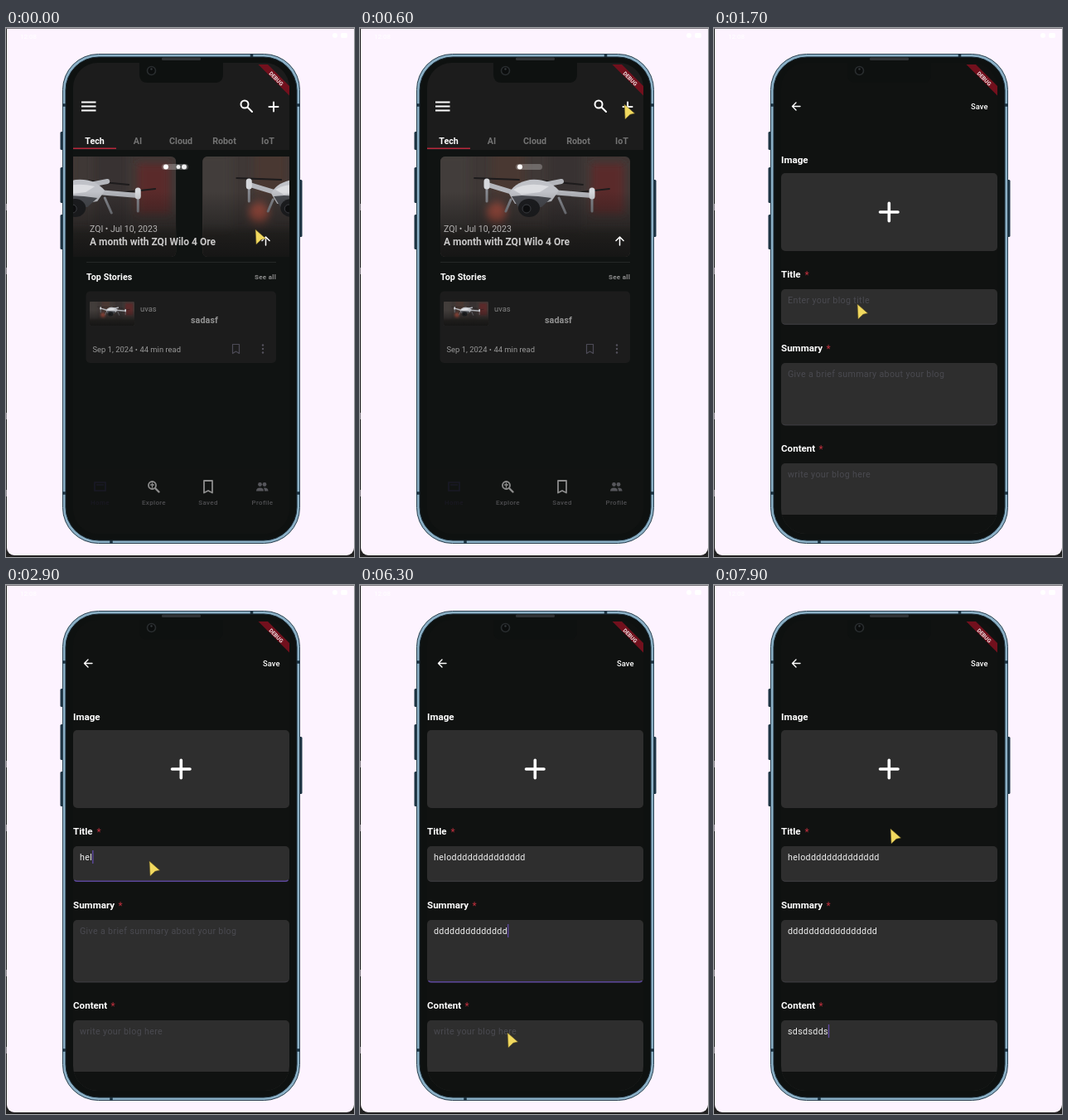
An HTML page for the animation above (8 s loop, 420x638 px).

```html
<!DOCTYPE html>
<html lang="en">
<head>
<meta charset="utf-8">
<title>Blog app</title>
<style>
html, body { margin: 0; width: 100%; height: 100%; overflow: hidden; background: #222; }
svg { display: block; width: 420px; height: 638px; font-family: Roboto, sans-serif; }
.b { font-weight: 700; }
.tab { font-size: 10.7px; font-weight: 700; fill: #747474; text-anchor: middle; }
.nav { font-size: 8px; font-weight: 500; letter-spacing: .335px; fill: #4e4e51; text-anchor: middle; }
.label { font-size: 11.6px; font-weight: 700; fill: #fff; }
.star { font-size: 12px; fill: #b92f3b; }
.entry, .hint { font-size: 10.7px; letter-spacing: .335px; fill: #eee; }
.hint { fill: #4a4a50; }
.line { fill: none; stroke-linecap: round; stroke-linejoin: round; }
</style>
</head>
<body>
<svg viewBox="0 0 420 638">
  <defs>
    <clipPath id="screen"><rect x="81" y="42" width="261" height="568" rx="30"/></clipPath>
    <clipPath id="banner"><rect x="81" y="44" width="261" height="60"/></clipPath>
    <clipPath id="view"><rect x="81" y="150" width="261" height="130"/></clipPath>
    <clipPath id="round"><rect width="229" height="121" rx="6"/></clipPath>
    <filter id="blur" x="-50%" y="-50%" width="200%" height="200%"><feGaussianBlur stdDeviation="5"/></filter>
    <linearGradient id="shade" x1="0" y1="0" x2="0" y2="1">
      <stop offset=".35" stop-color="#141414" stop-opacity="0"/>
      <stop offset="1" stop-color="#141414" stop-opacity=".92"/>
    </linearGradient>
    <g id="photo" clip-path="url(#round)">
      <rect width="229" height="121" fill="#3f3836"/>
      <g filter="url(#blur)">
        <rect x="-10" y="-5" width="45" height="140" fill="#433c3a"/>
        <rect x="62" y="-10" width="40" height="60" fill="#4a3733"/>
        <rect x="130" y="-10" width="40" height="110" fill="#393130"/>
        <rect x="182" y="8" width="40" height="62" fill="#5a2c2a"/>
        <rect x="-10" y="88" width="260" height="50" fill="#2e2927"/>
        <circle cx="68" cy="68" r="12" fill="#a8503f"/>
      </g>
      <g class="line">
        <path d="M41 26L95 28M121 29L172 34M140 46L204 39" stroke="#1d1b1c" stroke-width="1.800"/>
        <path d="M57 34L90 44M134 43L183 47M125 34L146 30" stroke="#b4b6bc" stroke-width="6"/>
        <path d="M56 34V54M183 46V66M143 50L151 68M85 52L79 66" stroke="#888b92" stroke-width="3"/>
        <path d="M56 30V36M183 41V48" stroke="#d6d8dc" stroke-width="7"/>
      </g>
      <path d="M83 45Q88 32 108 28Q130 26 143 41L134 54L112 58L90 57Z" fill="#c0c2c8"/>
      <path d="M88 40Q104 30 131 36L120 43L98 46Z" fill="#dcdde1"/>
      <path d="M86 48L98 47L118 48L134 50L122 61L94 61Z" fill="#4a4c52"/>
      <ellipse cx="107" cy="62" rx="13" ry="11" fill="#1b1c1f"/>
      <circle cx="104" cy="63" r="5" fill="#0a0b0d" stroke="#45474d"/>
      <rect width="229" height="121" fill="url(#shade)"/>
    </g>
  </defs>

  <rect x="1" y="1" width="419" height="635" rx="9" fill="#fdf3ff"/>
  <rect x="1" y="1" width="419" height="20" fill="#fdf3ff"/>
  <rect width="420" height="1" fill="#77727a"/>
  <path d="M0 212v8M0 289v8M0 464v8M0 557v8" stroke="#8a858e" stroke-width="2"/>
  <g fill="#fff"><text x="17" y="13" font-size="8">12:08</text><circle cx="397" cy="9" r="3"/><rect x="404" y="6" width="8" height="6" rx="2"/></g>

  <g fill="#1d3443">
    <rect x="65.500" y="125" width="5" height="22" rx="1.500"/><rect x="65.500" y="168" width="5" height="43" rx="1.500"/>
    <rect x="65.500" y="225" width="5" height="42" rx="1.500"/><rect x="353" y="183" width="4.500" height="69" rx="1.500"/>
  </g>
  <rect x="68.500" y="31.500" width="286" height="590" rx="43" fill="#8bb0c6" stroke="#2b4150"/>
  <path d="M68 93h4M351 93h4M68 561h4M351 561h4M296.500 31v4M127 618v4" stroke="#1d3443" stroke-width="3.500"/>
  <rect x="72" y="35" width="279" height="583" rx="40" fill="#0e1110" stroke="#182832"/>

  <g clip-path="url(#screen)">
    <g id="home">
      <rect x="81" y="42" width="261" height="568" fill="#101312"/>
      <rect x="81" y="42" width="261" height="105" fill="#1c1c1c"/>
      <path d="M91 89.500h17.500M91 94.500h17.500M91 99.500h17.500" stroke="#fff" stroke-width="2"/>
      <g class="line" stroke="#fff" stroke-width="2">
        <circle cx="288" cy="92" r="4.500"/><path d="M291.500 95.500L297 101M317.500 95h11M323 89.500v11"/>
      </g>
      <text class="tab" x="107" y="140" style="fill:#fff">Tech</text><text class="tab" x="159" y="140">AI</text>
      <text class="tab" x="211" y="140">Cloud</text><text class="tab" x="263.500" y="140">Robot</text><text class="tab" x="316" y="140">IoT</text>
      <rect x="81" y="144.500" width="52" height="1.500" fill="#b8283d"/>

      <g clip-path="url(#view)"><g id="slides"><use href="#photo" x="-261"/><use href="#photo"/></g></g>
      <rect x="188" y="164" width="32" height="7" rx="3.500" fill="#fff" opacity=".25"/>
      <circle cx="193" cy="167.500" r="3" fill="#fff"/>
      <g id="dots" fill="#eee"><circle cx="208" cy="167.500" r="2.500"/><circle cx="215" cy="167.500" r="3"/></g>
      <text x="101" y="245.500" font-size="10.500" fill="#b4b2b2">ZQI • Jul 10, 2023</text>
      <text class="b" x="101" y="261.500" font-size="12" fill="#c9c8c8">A month with ZQI Wilo 4 Ore</text>
      <path class="line" d="M313.500 262v-10M309 256.500l4.500-4.500 4.500 4.500" stroke="#fff" stroke-width="1.500"/>

      <rect x="97" y="282" width="229" height="1" fill="#252827"/>
      <text class="b" x="97" y="303.500" font-size="10.700" letter-spacing=".1" fill="#fff">Top Stories</text>
      <text class="b" x="300" y="303" font-size="8" letter-spacing=".3" fill="#8c8c8c">See all</text>
      <rect x="96.500" y="317.500" width="229.500" height="86.500" rx="5" fill="#1c1c1c"/>
      <use href="#photo" transform="translate(101 330) scale(.236 .24)"/>
      <text x="162" y="342" font-size="9.400" fill="#858585">uvas</text>
      <text class="b" x="223" y="356" font-size="10.700" letter-spacing=".1" fill="#929292">sadasf</text>
      <text x="104.500" y="390.500" font-size="9.400" letter-spacing=".03" fill="#989898">Sep 1, 2024 • 44 min read</text>
      <path class="line" d="M273.500 381.500h8v11l-4-2.500-4 2.500z" stroke="#4c4a56" stroke-width="1.200"/>
      <g fill="#55535e"><circle cx="310" cy="382.500" r="1.200"/><circle cx="310" cy="387" r="1.200"/><circle cx="310" cy="391.500" r="1.200"/></g>

      <rect x="81" y="532" width="261" height="78" fill="#111312"/>
      <path d="M107 548h13v10h-13zM109 551h9" fill="none" stroke="#1a1926" stroke-width="1.600"/>
      <g class="line" stroke="#8c8c8c" stroke-width="1.800">
        <circle cx="176.500" cy="551.500" r="4.500"/><path d="M180.500 555.500l4 4" stroke-width="2.400"/><path d="M176.500 549v5M174.500 551h4" stroke-width="1.300"/>
        <path d="M239 546h10v14.500l-5-2.500-5 2.500z"/>
      </g>
      <g fill="#56565b"><circle cx="306.500" cy="550.500" r="2.400"/><circle cx="312" cy="550.500" r="2.400"/><path d="M302 558.500q0-4 4.500-4t4.500 4zM312 558.500q0-2-1-4 5.500-.5 5.500 4z"/></g>
      <text class="nav" x="113.500" y="575" style="fill:#1a1922">Home</text><text class="nav" x="178.500" y="575">Explore</text>
      <text class="nav" x="244" y="575">Saved</text><text class="nav" x="309.500" y="575">Profile</text>
    </g>

    <g id="form">
      <rect x="81" y="42" width="261" height="568" fill="#101211"/>
      <path class="line" d="M104 94.500h-9M99 90l-4.500 4.500 4.500 4.500" stroke="#fff" stroke-width="1.400"/>
      <text x="310" y="98" font-size="9.400" font-weight="500" letter-spacing=".07" fill="#fff">Save</text>
      <text class="label" x="81" y="163">Image</text>
      <rect x="81" y="175" width="261" height="94" rx="5" fill="#2e2e2e"/>
      <path class="line" d="M200.500 222h21.500M211.300 211.200v21.600" stroke="#fff" stroke-width="3.600"/>
      <g id="fields"></g>
      <rect id="caret" width="1.300" height="16" fill="#624aa8"/>
    </g>
  </g>

  <path d="M161 41H262V56Q262 66 252 66H171Q161 66 161 56Z" fill="#0e1110"/>
  <rect x="188" y="35.500" width="47" height="3.500" rx="1.500" fill="#303335"/>
  <circle cx="175.500" cy="51.500" r="5" fill="#0b0d0d" stroke="#292d2f" stroke-width="1.600"/><circle cx="175.500" cy="49.500" r="1.200" fill="#34393c"/>
  <g clip-path="url(#banner)">
    <path d="M304 43.500H315.500L343 71V82.500Z" fill="#72101d"/>
    <text class="b" transform="translate(326 61) rotate(45)" y="2.300" text-anchor="middle" font-size="6.600" fill="#f4e4e6">DEBUG</text>
  </g>
  <path id="cursor" d="M0 0L12.500 11L7 12.300L1 18Z" fill="#f1d95f" stroke="#6b5b26" stroke-width=".6" stroke-linejoin="round"/>
</svg>

<script>
const $ = id => document.getElementById(id);
const clamp = x => Math.min(1, Math.max(0, x));
const LOOP = 8000;
const keys = (start, step, count) => Array.from({ length: count }, (_, i) => start + i * step);

// top and height of the box, label, hint, focus time, typed text and the time of each key
const fields = [
  { y: 315, h: 43, name: 'Title', star: 109.5, hint: 'Enter your blog title', focus: 1850,
    text: 'helo' + 'd'.repeat(14), times: [2590, 2690, 2860, 3120, 3370, ...keys(4080, 52, 13)] },
  { y: 404, h: 75.5, name: 'Summary', star: 135.5, hint: 'Give a brief summary about your blog', focus: 4980,
    text: 'd'.repeat(17), times: [5280, ...keys(5580, 58, 16)] },
  { y: 525, h: 90, name: 'Content', star: 126.5, hint: 'write your blog here', focus: 6490,
    text: 'sdsdsdds', times: [6700, 6800, 6900, 7050, 7150, 7250, 7400, 7600] }
];

$('fields').innerHTML = fields.map(({ y, h, name, star, hint }) => `
  <text class="label" x="81" y="${y - 14.2}">${name}</text><text class="star" x="${star}" y="${y - 12.7}">*</text>
  <rect x="81" y="${y}" width="261" height="${h}" rx="5" fill="#2e2e2e"/>
  <path class="under line" d="M83 ${y + h - 1.8}q1 1 3 1H337q2 0 3-1"/>
  <text class="hint" x="89" y="${y + 17}">${hint}</text><text class="entry" x="89" y="${y + 17}"></text>`).join('') +
  '<rect x="81" y="587" width="261" height="30" fill="#101211"/>';
const unders = document.querySelectorAll('.under');
const hints = document.querySelectorAll('.hint');
const entries = document.querySelectorAll('.entry');

// time, x, y of the pointer tip
const path = [
  [0, 301, 243], [200, 304, 142], [450, 319, 92], [650, 319, 92], [980, 184, 341], [1020, 184, 341],
  [1600, 173, 333], [4350, 173, 333], [4750, 180, 432], [5700, 180, 432], [6200, 178, 540],
  [6700, 178, 540], [7300, 205, 275], [7550, 222, 206], [7880, 213, 294], [LOOP, 213, 294]
];

function pointer(t) {
  const i = path.findIndex(p => p[0] > t);
  const [t0, x0, y0] = path[i - 1], [t1, x1, y1] = path[i];
  const p = (t - t0) / (t1 - t0), e = p * p * (3 - 2 * p);
  return `translate(${x0 + (x1 - x0) * e} ${y0 + (y1 - y0) * e})`;
}

function drawFields(t) {
  const active = fields.findLastIndex(f => t >= f.focus);
  $('caret').style.opacity = 0;
  fields.forEach((f, i) => {
    const on = i === active;
    const typed = f.times.filter(k => k <= t).length;
    entries[i].textContent = f.text.slice(0, typed);
    hints[i].style.display = typed ? 'none' : '';
    unders[i].setAttribute('stroke-width', on ? 1.5 : 0.8);
    unders[i].setAttribute('stroke', on ? '#5a459a' : '#3f3e44');
    if (!on) return;
    const last = typed ? f.times[typed - 1] : f.focus;
    $('caret').setAttribute('x', 89 + (typed ? entries[i].getComputedTextLength() : 0));
    $('caret').setAttribute('y', f.y + 5);
    $('caret').style.opacity = (t - last) % 1000 < 500 ? 1 : 0;
  });
}

const zoom = s => `translate(211.5 327) scale(${s}) translate(-211.5 -327)`;

function frame(now) {
  const t = now % LOOP;
  const x = 97 + 141 * Math.pow(1 - clamp(t / 650), 3.4);
  $('slides').setAttribute('transform', `translate(${x} 155)`);
  $('dots').style.opacity = t < 100 ? 1 : 0;

  const p = clamp((t - 650) / 430), ease = 1 - (1 - p) ** 2;
  $('home').setAttribute('transform', zoom(1 + 0.05 * ease));
  $('home').style.display = p < 1 ? '' : 'none';
  $('form').setAttribute('transform', zoom(0.85 + 0.15 * ease));
  $('form').style.opacity = clamp(p * 2.5);

  drawFields(t);
  $('cursor').setAttribute('transform', pointer(t));
  requestAnimationFrame(frame);
}
requestAnimationFrame(frame);
</script>
</body>
</html>
```
